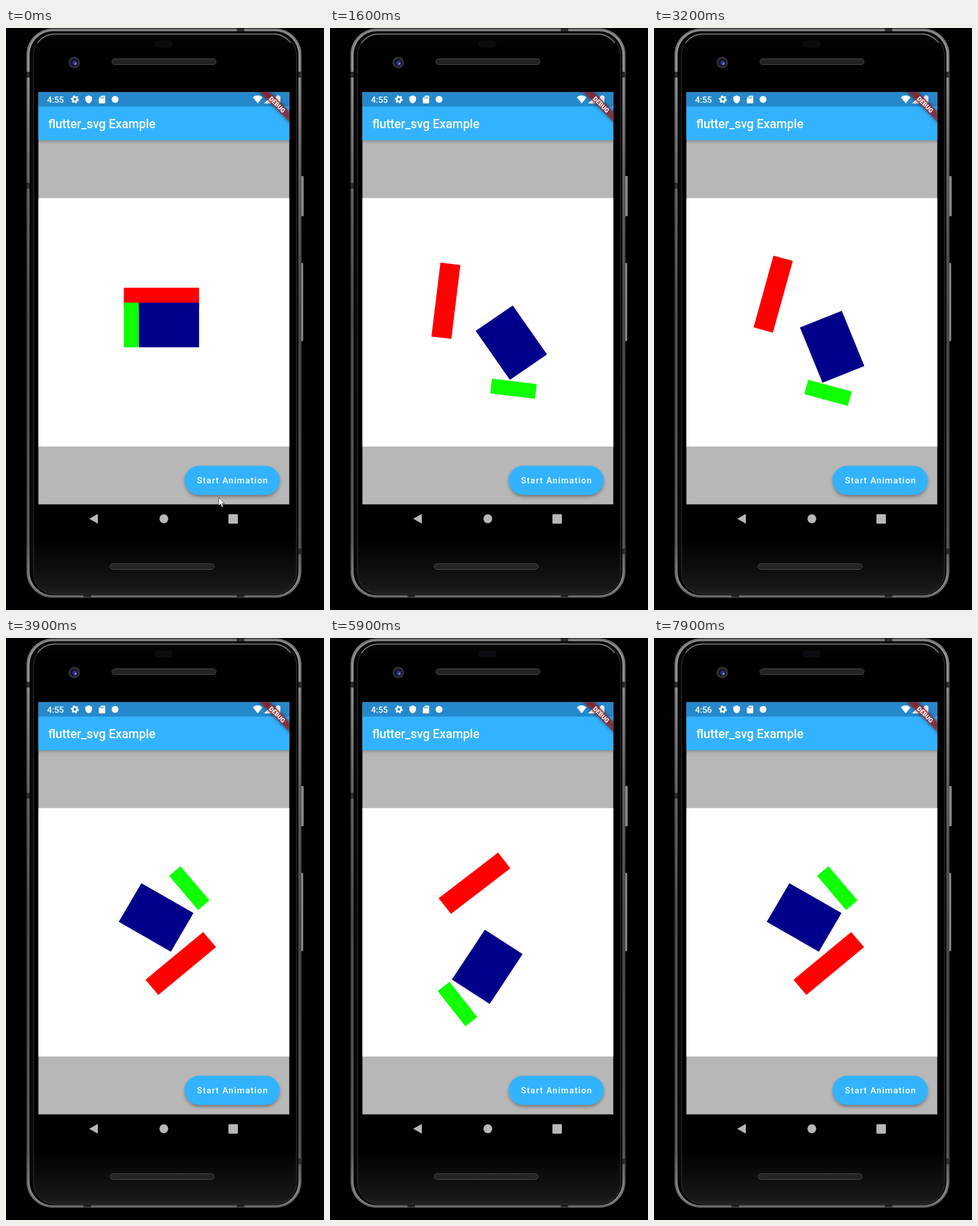
Animation, 554 px wide and 1011 px high, one loop 8 s. Source, as an HTML page:

```html
<!DOCTYPE html>
<html lang="en">
<head>
<meta charset="utf-8">
<title>flutter_svg Example</title>
<style>
  html, body { margin: 0; width: 100%; height: 100%; overflow: hidden; background: #000; }
  svg { display: block; width: 100vw; height: 100vh; }
  text { font-family: Roboto, "Noto Sans", sans-serif; font-weight: 500; fill: #fff; }
</style>
</head>
<body>
<svg viewBox="0 0 554 1011">
  <defs>
    <linearGradient id="rim" x1="0" x2="0" y1="0" y2="1">
      <stop offset="0" stop-color="#8c8c8c"/>
      <stop offset=".06" stop-color="#9a9a9a"/>
      <stop offset=".25" stop-color="#6a6a6a"/>
      <stop offset=".5" stop-color="#4c4c4c"/>
      <stop offset=".9" stop-color="#5a5a5a"/>
      <stop offset=".97" stop-color="#8a8a8a"/>
      <stop offset="1" stop-color="#7a7a7a"/>
    </linearGradient>
    <linearGradient id="glass" x1="0" x2="0" y1="0" y2="1">
      <stop offset="0" stop-color="#060606"/>
      <stop offset=".03" stop-color="#000"/>
      <stop offset=".9" stop-color="#000"/>
      <stop offset=".985" stop-color="#161616"/>
      <stop offset="1" stop-color="#202020"/>
    </linearGradient>
    <linearGradient id="key" x1="0" x2="1" y1="0" y2="0">
      <stop offset="0" stop-color="#333"/>
      <stop offset=".6" stop-color="#9a9a9a"/>
      <stop offset="1" stop-color="#555"/>
    </linearGradient>
    <pattern id="mesh" width="3" height="3" patternUnits="userSpaceOnUse">
      <rect width="3" height="3" fill="#262626"/>
      <circle cx="1.5" cy="1.5" r=".8" fill="#161616"/>
    </pattern>
    <filter id="soft" x="-20%" y="-50%" width="140%" height="220%">
      <feGaussianBlur stdDeviation="3"/>
    </filter>
    <clipPath id="screen"><rect x="56.5" y="111.5" width="437" height="716"/></clipPath>
    <clipPath id="pill"><rect x="311" y="760.5" width="166" height="50.5" rx="25.25"/></clipPath>
  </defs>

  <!-- phone body -->
  <rect width="554" height="1011"/>
  <g fill="url(#key)">
    <rect x="512" y="257" width="7" height="70" rx="2"/>
    <rect x="512" y="408" width="6" height="136" rx="2"/>
  </g>
  <rect x="36" y="1" width="478.5" height="988.5" rx="45" fill="url(#rim)"/>
  <rect x="37.5" y="2.5" width="475.5" height="985.5" rx="43.5" fill="none" stroke="#333" stroke-opacity=".6"/>
  <g fill="#2c2c2c">
    <rect x="36" y="76" width="6" height="10"/>
    <rect x="36" y="269" width="6" height="10"/>
    <rect x="508" y="76" width="6" height="10"/>
    <rect x="508" y="904" width="6" height="10"/>
    <rect x="402" y="1" width="13" height="5"/>
    <rect x="135" y="985" width="13" height="4"/>
    <rect x="402" y="985" width="13" height="4"/>
  </g>
  <rect x="41" y="5.5" width="468.5" height="980" rx="41" fill="#070707"/>
  <rect x="48" y="10.5" width="458" height="973" rx="37" fill="url(#glass)" stroke="#3c3c3c"/>
  <path d="M55 26Q66 10.500 86 10.500H465Q484 10.500 496 26" fill="none" stroke="#8f8f8f" stroke-width="1.300"/>
  <rect x="259" y="22" width="31" height="12" rx="5" fill="#0b0b10"/>
  <g fill="url(#mesh)" stroke="#505050">
    <rect x="184.500" y="53.500" width="181.500" height="10" rx="5"/>
    <rect x="181.500" y="930.500" width="181" height="10" rx="5"/>
  </g>
  <circle cx="119" cy="60" r="10" fill="#333339"/>
  <circle cx="119" cy="60" r="7" fill="#15152a"/>
  <circle cx="120" cy="61" r="4" fill="#34348c"/>
  <circle cx="121" cy="62" r="1.500" fill="#9aa0f0"/>

  <!-- app -->
  <g clip-path="url(#screen)">
    <rect x="56" y="111" width="438" height="717" fill="#b7b7b7"/>
    <rect x="50" y="140" width="450" height="56" fill="#000" opacity=".36" filter="url(#soft)"/>
    <rect x="56" y="136" width="438" height="59" fill="#33b3ff"/>
    <rect x="56" y="111" width="438" height="25.500" fill="#2688cc"/>
    <rect x="56" y="295.500" width="438" height="431.500" fill="#fff"/>
    <text id="clock" x="71.500" y="129.800" font-size="14.900">4:55</text>
    <text x="73.700" y="173.700" font-size="21.200">flutter_svg Example</text>

    <g fill="#fff">
      <g id="gear"></g>
      <path d="M144 117l5.800 2.500v4c0 3.600-2.500 6.500-5.800 7.500c-3.300-1-5.800-3.900-5.800-7.500v-4z"/>
      <path d="M166 117.500h5.500q1.200 0 1.200 1.200v11.100q0 1.200-1.200 1.200h-8.600q-1.200 0-1.200-1.200v-8z"/>
      <circle cx="190" cy="124" r="6"/>
      <path d="M438.500 131L430 120.200Q438.500 113.600 447 120.200z"/>
      <path d="M449.500 131L463 117.500V131z"/>
      <path d="M470 118.500h2.200v-1.500h3.600v1.500h2.200v12.500h-8z"/>
    </g>
    <path d="M165 119.500v3M167.300 119.500v3M169.600 119.500v3" stroke="#2688cc" stroke-width="1.100"/>

    <g transform="translate(472.500 133) rotate(45)">
      <rect x="-50" y="-6.400" width="100" height="12.800" opacity=".5" filter="url(#soft)"/>
      <rect x="-50" y="-6.400" width="100" height="12.800" fill="#b71c1c" opacity=".63"/>
      <text y="3.800" font-size="10.800" style="font-weight:900" text-anchor="middle">DEBUG</text>
    </g>

    <g id="art" shape-rendering="geometricPrecision">
      <rect id="red" x="-8" y="-7" width="15" height="4" fill="#f00"/>
      <rect id="green" x="-8" y="-4" width="3" height="9" fill="#10ff04"/>
      <rect id="blue" x="-5" y="-4" width="12" height="9" fill="#00008b"/>
    </g>

    <rect id="shade" x="312" y="764" width="164" height="50" rx="25" fill="#000" filter="url(#soft)"/>
    <g clip-path="url(#pill)">
      <rect x="311" y="760" width="166" height="51" fill="#33b3ff"/>
      <circle id="ripple" cx="376" cy="802" fill="#fff" opacity="0"/>
    </g>
    <text x="332.700" y="791" font-size="14.900" letter-spacing="1.330">Start Animation</text>
  </g>

  <!-- navigation bar -->
  <g fill="#b8b8b8">
    <path d="M145 852.500L160 844V861z"/>
    <circle cx="275" cy="852.500" r="7.700"/>
    <rect x="387.500" y="844.500" width="16.500" height="16.500" rx="1.500"/>
  </g>
  <path id="cursor" d="M0 0V14.500L3.300 11.500L5.600 16.800L8 15.800L5.700 10.600H10z" fill="#fff" stroke="#333" stroke-width=".9"/>
</svg>
<script>
const LOOP = 8000, STEP = 100;
const START = 425, HALF = 2000, LAG = 9;
const $ = id => document.getElementById(id);
const set = (id, attrs) => {
  for (const k in attrs) $(id).setAttribute(k, attrs[k]);
};
const clamp = x => Math.min(1, Math.max(0, x));
const span = (t, a, b) => clamp((t - a) / (b - a));

function drawGear() {
  let d = '';
  for (let i = 0; i < 48; i++) {
    const a = i / 48 * 2 * Math.PI, r = i % 8 < 4 ? 7 : 5.2;
    d += (i ? 'L' : 'M') + (120 + r * Math.cos(a)).toFixed(2) + ' ' + (124 + r * Math.sin(a)).toFixed(2);
  }
  $('gear').innerHTML = `<path fill-rule="evenodd" d="${d}zM122.400 124a2.400 2.400 0 1 0-4.800 0a2.400 2.400 0 1 0 4.800 0z"/>`;
}

// cubic-bezier(0, 0, .58, 1)
function easeOut(x) {
  let lo = 0, hi = 1;
  for (let i = 0; i < 30; i++) {
    const s = (lo + hi) / 2;
    if (s * s * (1.74 - 0.74 * s) < x) lo = s; else hi = s;
  }
  return lo * lo * (3 - 2 * lo);
}

// runs forward, then back, and so on
function progress(t) {
  if (t <= START) return 0;
  const m = (t - START) % (2 * HALF);
  const run = HALF - Math.abs(m - HALF);
  return easeOut(clamp((run - LAG) / HALF));
}

function render(t) {
  const p = progress(t);
  set('art', { transform: `translate(275.2 511.500) scale(8.740 8.620) rotate(${360 * p})` });
  set('red', { transform: `translate(${5 * p} ${-5 * p})` });
  set('green', { transform: `translate(${-8 * p} ${8 * p})` });
  set('blue', { transform: `translate(${-4 * p} ${4 * p}) rotate(${180 * p} 0 1)` });

  // press on the button
  const move = span(t, 0, 300) - span(t, 700, 1000);
  set('cursor', {
    transform: `translate(${370.5 + 5 * move} ${815.5 - 14 * move})`,
    visibility: t < 1300 ? 'visible' : 'hidden'
  });
  const press = span(t, 250, 400) * (1 - span(t, 450, 800));
  set('ripple', { r: 20 + 110 * span(t, 250, 700), opacity: 0.24 * press });
  set('shade', { opacity: 0.38 + 0.1 * press });

  $('clock').textContent = t < 7600 ? '4:55' : '4:56';
}

const begin = performance.now();
function tick() {
  const t = (performance.now() - begin) % LOOP;
  render(Math.floor(t / STEP) * STEP);
  requestAnimationFrame(tick);
}
drawGear();
render(0);
requestAnimationFrame(tick);
</script>
</body>
</html>
```
